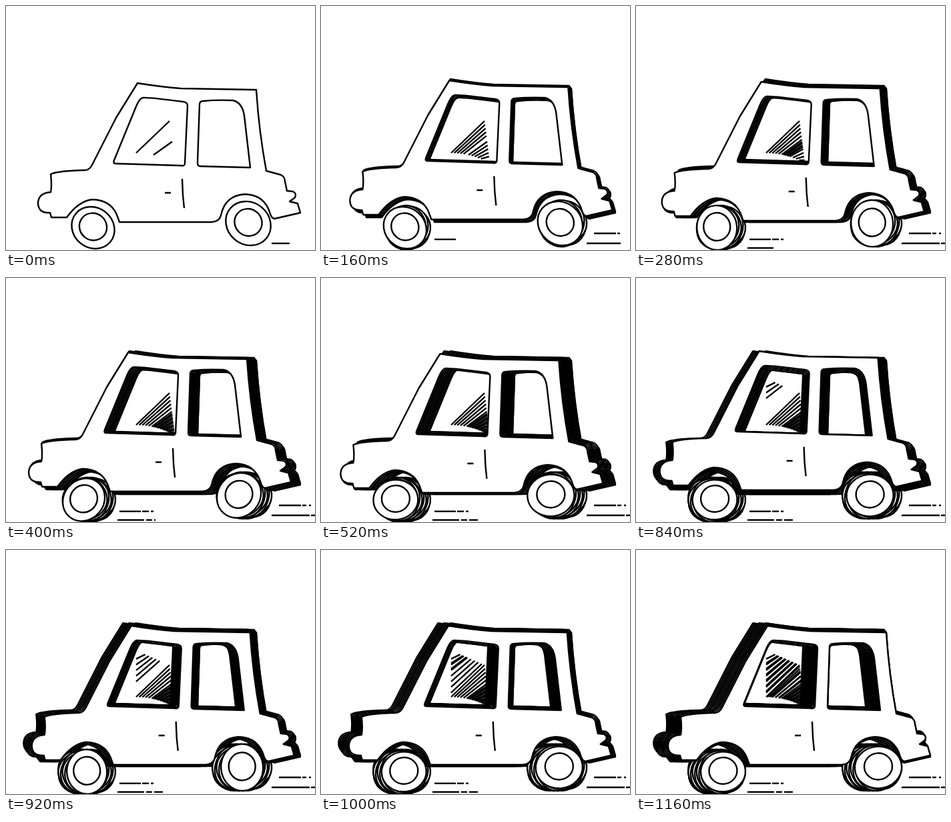
An HTML page with a canvas for the animation above (1200 ms loop, 463 px wide and 367 px high).

```html
<!DOCTYPE html>
<html lang="en">
<head>
<meta charset="utf-8">
<title>Bouncing car</title>
<style>
  html, body { margin: 0; width: 100%; height: 100%; overflow: hidden; background: #fff; }
  canvas { display: block; }
</style>
</head>
<body>
<canvas id="stage" width="463" height="367"></canvas>
<script>
const ctx = document.getElementById('stage').getContext('2d');
const STEP = 40, STEPS = 30;

// Shell with openings for the windows and wheel arches.
const shell = new Path2D(`
  M197 116 Q235 122 262 124 L375 126 Q379 188 390 248 L412 254
  Q418 257 418 264 L421 278 L430 279 Q436 282 433 288 L425 294 L437 297
  L441 311 L402 320 Q398 319 396 313 Q388 284 358 283 Q328 285 322 315
  Q320 324 308 325 L170 325 L166 314 Q157 292 129 291 Q108 294 91 318
  L68 318 L66 311 Q48 312 48 296 Q49 281 67 280 Q69 270 67 253
  Q76 248 118 247 Q125 247 129 239 L165 168 Z
  M205 138 Q212 137 266 144 Q272 145 272 150 L268 237 Q268 241 262 240
  L164 237 Q160 237 162 232 L195 151 Q200 139 205 138 Z
  M295 143 Q315 141 340 142 Q354 145 357 165 L366 243 L291 241
  Q287 241 287 236 L290 147 Q291 143 295 143 Z`);
const details = new Path2D('M264 260 L265 284 L267 304 M238 281 H247');

// Speed lines: y, first step, then pairs of start and end.
const dashes = [
  [357, 0, 398, 455, 457, 463],
  [342, 2, 409, 442, 444, 450, 454, 457],
  [351, 3, 170, 202, 204, 214, 217, 221],
  [364, 5, 167, 207, 210, 219, 222, 235]
];

const shiftAt = n => -1.55 * Math.max(0, 14 - Math.abs(n - 15));
const bobAt = n => -2 * (3 - Math.abs(n % 6 - 3));

function line(x1, y1, x2, y2) {
  ctx.beginPath();
  ctx.moveTo(x1, y1);
  ctx.lineTo(x2, y2);
  ctx.stroke();
}

// One glass reflection; u = 0 and u = 1 are the two resting places.
function glint(u) {
  if (u < -1.6 || u > 2) return;
  if (u < 0) line(195, 221 + 36 * u, 245 + 23 * u, 173 + 10 * u);
  else line(195 + 26 * u, 221 + 3 * u * u, 245 + 4 * u, 173 + 31 * u);
}

function ring(x, y, rx, ry, turn) {
  ctx.beginPath();
  ctx.ellipse(x, y, rx, ry, turn, 0, 7);
  ctx.fill();
  ctx.stroke();
}

function wheel(x, y, size, turn) {
  ring(x, y, 33.5 * size, 30 * size, turn);
  ring(x, y - 1.5, 21, 20, turn);
}

function car(n) {
  const x = shiftAt(n), turn = 0.7 - n * Math.PI / 4;
  const u = n < 15 ? n * 0.18 : (n - 30) * 0.235;
  glint(u);
  glint(u + 1);
  ctx.save();
  ctx.translate(x, bobAt(n));
  ctx.fill(shell, 'evenodd');
  ctx.stroke(shell);
  ctx.stroke(details);
  ctx.restore();
  wheel(130.5 + x, 333.5, 1, turn);
  wheel(363 + x, 327, 1.05, turn);
}

function speedLines(n) {
  for (const [y, first, ...xs] of dashes) {
    if (n < first) continue;
    const reach = xs[0] + 27 + (n - first) * 6;
    for (let i = 0; i < xs.length; i += 2) {
      if (reach > xs[i]) line(xs[i], y, Math.min(xs[i + 1], reach), y);
    }
  }
}

function draw(now) {
  const last = Math.floor(now / STEP) % STEPS;
  ctx.fillStyle = '#fff';
  ctx.strokeStyle = '#000';
  ctx.lineWidth = 2.4;
  ctx.lineJoin = 'round';
  ctx.fillRect(0, 0, 463, 367);
  // Every pose stays on the page until the loop restarts.
  for (let n = 0; n <= last; n++) car(n);
  speedLines(last);
  requestAnimationFrame(draw);
}
requestAnimationFrame(draw);
</script>
</body>
</html>
```
